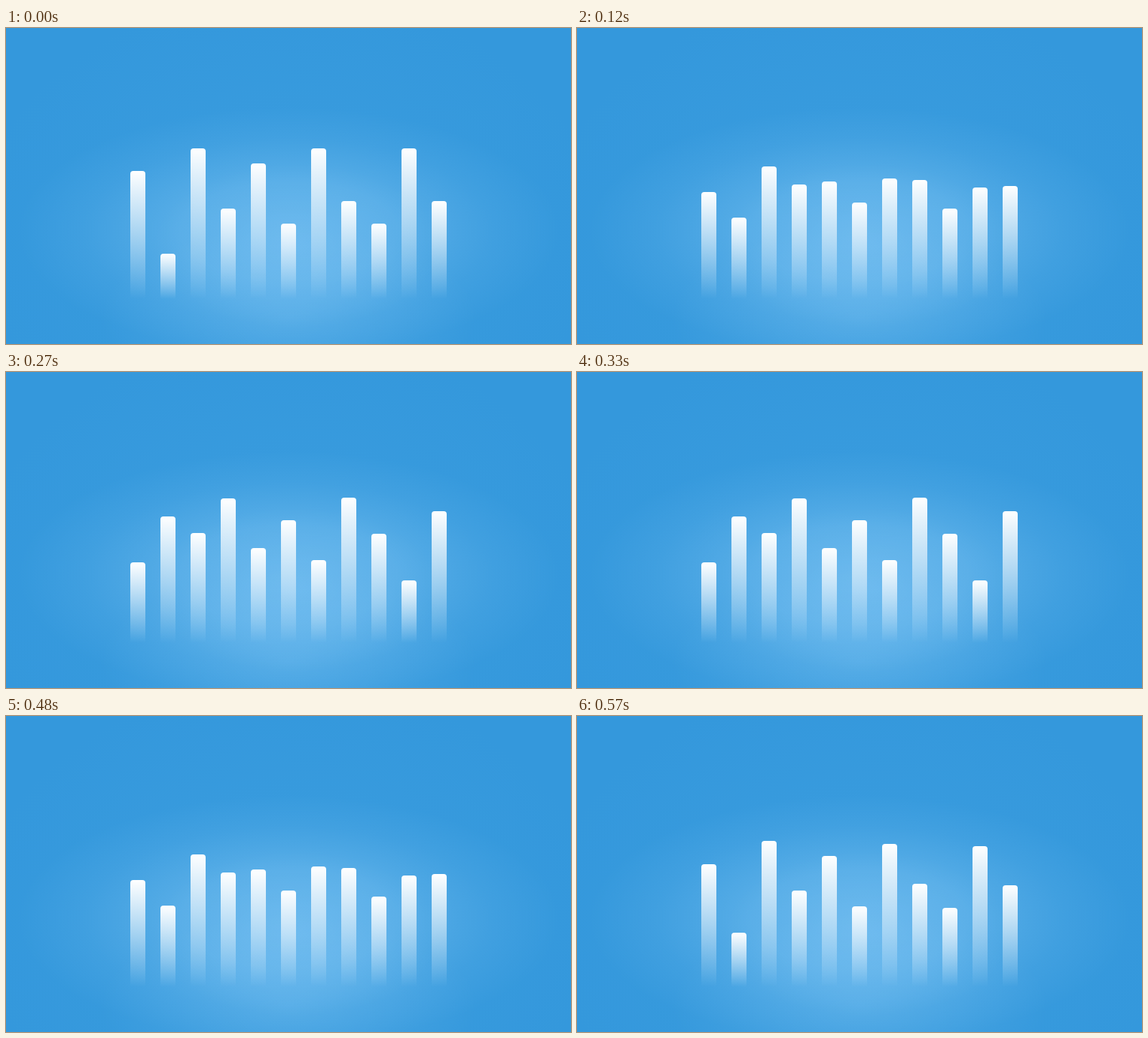
Animation of 750x420 px, one loop 600 ms. Source, as an HTML page:

```html
<!DOCTYPE html>
<html lang="en">
<head>
<meta charset="utf-8">
<title>Equalizer</title>
<style>
  html, body { margin: 0; width: 100%; height: 100%; overflow: hidden; }
  #stage {
    position: relative;
    width: 750px;
    height: 420px;
    overflow: hidden;
    background:
      radial-gradient(190px 110px at 385px 290px, rgba(160,215,255,.2), rgba(160,215,255,.1) 50%, rgba(160,215,255,0)),
      radial-gradient(250px 120px at 375px 385px, rgba(150,210,250,.24), rgba(150,210,250,.12) 50%, rgba(150,210,250,0)),
      radial-gradient(360px 165px at 375px 270px, rgba(150,210,250,.42), rgba(150,210,250,.33) 40%, rgba(150,210,250,.1) 75%, rgba(150,210,250,0)),
      radial-gradient(420px 320px at 375px 270px, rgba(90,180,235,.18), rgba(90,180,235,0)),
      #3498dc;
  }
  .bar {
    position: absolute;
    bottom: 60px;
    width: 20px;
    border-radius: 4px 4px 0 0;
    background: linear-gradient(#fff, rgba(255,255,255,0));
  }
</style>
</head>
<body>
<div id="stage"></div>
<script>
  const STEP = 30, HALF = 10;
  // Bar heights at the two ends of the swing.
  const bars = [
    [170, 100], [60, 180], [200, 140], [120, 200], [180, 120], [100, 170],
    [200, 100], [130, 200], [100, 150], [200, 70], [130, 180]
  ];
  const stage = document.getElementById("stage");
  const nodes = bars.map((_, i) => {
    const node = document.createElement("div");
    node.className = "bar";
    node.style.left = 165 + i * 40 + "px";
    stage.append(node);
    return node;
  });

  function draw(time) {
    const step = Math.floor(time / STEP) % (2 * HALF);
    const swing = (HALF - Math.abs(step - HALF)) / HALF;
    bars.forEach(([from, to], i) => {
      nodes[i].style.height = from + (to - from) * swing + "px";
    });
  }

  const start = performance.now();
  function tick() {
    draw(performance.now() - start);
    requestAnimationFrame(tick);
  }
  tick();
</script>
</body>
</html>
```
